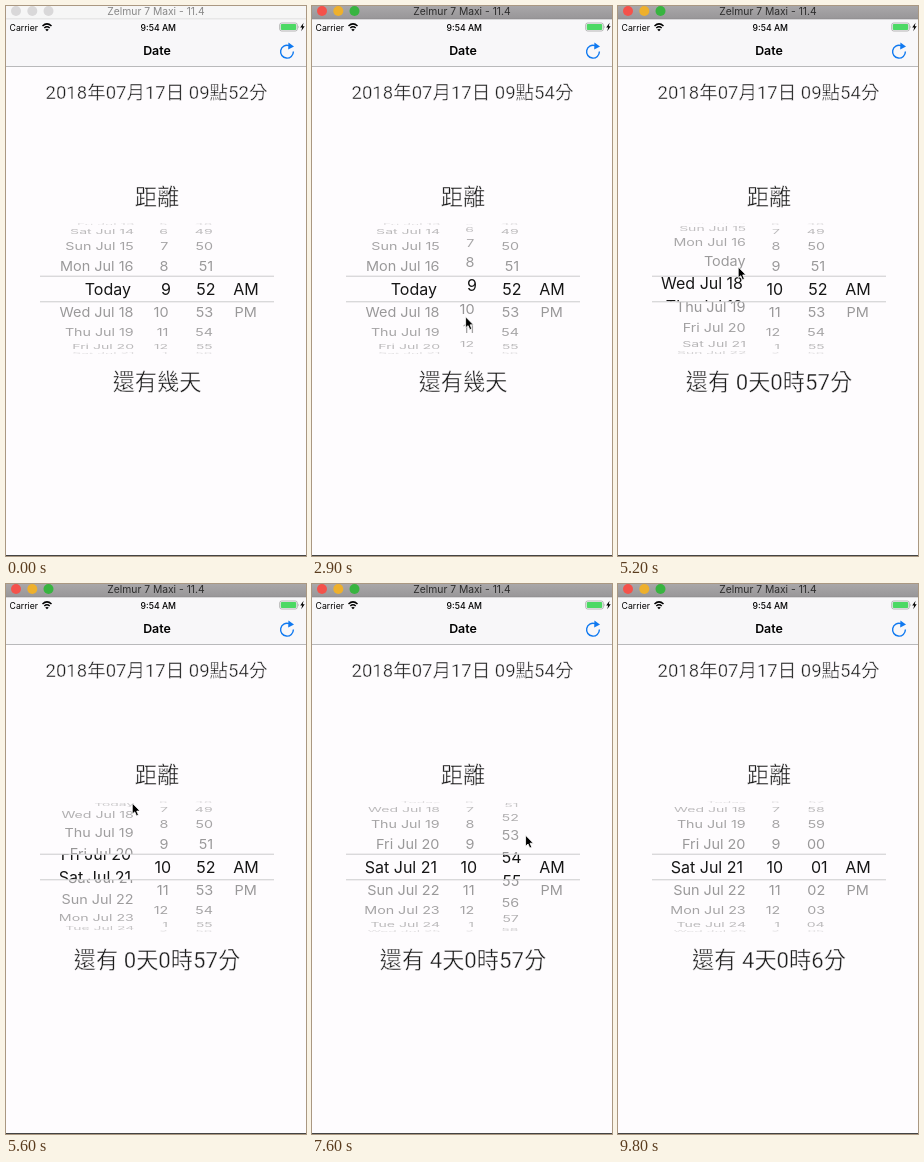
An HTML page that plays this animation: 300 px wide and 550 px high, repeating every 10 s.

```html
<!DOCTYPE html>
<html lang="zh-Hant">
<head>
<meta charset="utf-8">
<title>Date</title>
<style>
  html, body { margin: 0; width: 100%; height: 100%; overflow: hidden; background: #fefcfe; }
  svg { display: block; width: 300px; height: 550px; }
  text { font-family: Inter, "Open Sans", sans-serif; white-space: pre; }
  .mid { text-anchor: middle; }
  /* the pale stroke thins the glyphs to a light weight */
  .label { font-family: Roboto, "Noto Sans CJK TC", "Noto Sans CJK", sans-serif; font-size: 22.2px; fill: #1c1c1c; stroke: #fefcfe; stroke-width: .45; }
  .wheel { font-size: 16px; fill: #161616; }
  #bar { fill: #f6f6f6; }
  #edge { fill: #dadada; }
  #lights { fill: #d9d8d9; }
  #title { fill: #888; font-size: 10.3px; }
  .active #bar { fill: url(#metal); }
  .active #edge { fill: #8f8d8f; }
  .active #title { fill: #2c2c2c; }
  .active .red { fill: #f4524b; }
  .active .yellow { fill: #eeb02c; }
  .active .green { fill: #38b440; }
</style>
</head>
<body>
<svg id="stage" viewBox="0 0 300 550">
  <defs>
    <linearGradient id="metal" x2="0" y2="1">
      <stop stop-color="#a9a7a9"/><stop offset="1" stop-color="#989698"/>
    </linearGradient>
    <clipPath id="inside"><path d="M30 270.5H272V295.5H30Z"/></clipPath>
    <clipPath id="outside"><path d="M30 216H272V270H30ZM30 296H272V350H30Z"/></clipPath>
  </defs>
  <rect width="300" height="550" fill="#fefcfe"/>
  <rect y="13" width="300" height="47" fill="#f8f7f9"/>
  <rect y="60" width="300" height="1" fill="#b9b9bb"/>
  <rect y="549" width="300" height="1" fill="#444"/>

  <rect id="bar" width="300" height="13"/>
  <rect id="edge" y="12.5" width="300" height=".8"/>
  <g id="lights">
    <circle class="red" cx="10" cy="5" r="5"/>
    <circle class="yellow" cx="26.3" cy="5" r="5"/>
    <circle class="green" cx="42.5" cy="5" r="5"/>
  </g>
  <text id="title" class="mid" x="150" y="9">Zelmur 7 Maxi - 11.4</text>

  <text x="3.6" y="24.5" font-size="8.7">Carrier</text>
  <g fill="none" stroke="#000" stroke-width="1.5">
    <path d="M36.5 20Q41 15.8 45.5 20M38.3 22Q41 19.6 43.7 22"/>
    <path d="M39.8 23.2L41 24.4 42.2 23.2" stroke-width="1.3"/>
  </g>
  <text class="mid" x="152.3" y="24.5" font-size="8.7" font-weight="500">9:54 AM</text>
  <rect x="273.7" y="17" width="17.6" height="8" rx="2" fill="none" stroke="#999" stroke-width=".7"/>
  <rect x="274.8" y="18.1" width="15.4" height="5.8" rx="1" fill="#4cd964"/>
  <path d="M292.2 19.6Q293.4 21 292.2 22.4Z" fill="#999"/>
  <path d="M297.6 16.8L294.2 21.6H296.2L295.2 25.2 298.7 20.3H296.7Z"/>
  <text class="mid" x="151" y="49.3" font-size="12.4" font-weight="600">Date</text>
  <path d="M287.4 45.6A6.4 6.4 0 1 1 283 39.6" fill="none" stroke="#1079f0" stroke-width="1.4"/>
  <path d="M282.4 36.6L288 40.6 282.2 43.4Z" fill="#1079f0"/>

  <text id="now" class="label mid" x="150.5" y="92.8" style="font-size:18.5px"></text>
  <text class="label mid" x="151" y="199">距離</text>
  <text id="left" class="label mid" x="151" y="383.5"></text>

  <g id="outer" class="wheel" clip-path="url(#outside)"></g>
  <g id="lens" class="wheel" clip-path="url(#inside)"></g>
  <path d="M34 270.2H268M34 295.8H268" stroke="#c6c6c8" stroke-width=".9"/>

  <path id="cursor" d="M0 0V11L2.5 8.8 4.2 12.8 6.2 12 4.5 8H7.8Z" stroke="#fff" stroke-width=".8"/>
</svg>
<script>
const LOOP = 10000, STEP = 100;
const CENTER = 283, RADIUS = 65, ANGLE = 20.7 * Math.PI / 180, REACH = 4;
const byId = id => document.getElementById(id);
const mod = (n, size) => (n % size + size) % size;

// eased progress from 0 to 1 between two times
function ease(t, start, end) {
  const u = Math.min(Math.max((t - start) / (end - start), 0), 1);
  return u * u * (3 - 2 * u);
}

// pointer moves: start, end, x, y; it rests in between
const entry = [290, 150];
const moves = [
  [100, 600, 281, 47],    // to the refresh button
  [1000, 1600, 205, 319],
  [1600, 2400, 154, 315], // to the hours
  [2700, 3400, 152, 294],
  [3400, 3800, 144, 305],
  [3800, 4600, 116, 290], // to the days
  [4800, 5750, 127, 214],
  [6300, 6400, 138, 211],
  [6400, 7100, 198, 289], // to the minutes
  [7200, 7800, 219, 238],
  [7800, 8400, 198, 265],
  [8400, 9300, 201, 243],
  [9400, 9700, 266, 242]
];

function pointerAt(t) {
  return moves.reduce(([x, y], [start, end, toX, toY]) => {
    const k = ease(t, start, end);
    return [x + (toX - x) * k, y + (toY - y) * k];
  }, entry);
}

const dayName = n => n ? new Date(2018, 6, 17 + n).toDateString().slice(0, 10) : 'Today';

// edge: anchor in the lens; pivot: point the smaller rows shrink towards
const columns = [
  { edge: 125, pivot: 150, anchor: 'end', roll: t => 4 * ease(t, 4850, 5800), name: dayName },
  { edge: 165, pivot: 140, anchor: 'end', roll: t => ease(t, 2700, 3500), name: n => mod(n + 8, 12) + 1 },
  { edge: 209.5, pivot: 186, anchor: 'end', roll: t => 8 * ease(t, 7200, 8300) + ease(t, 8250, 9350),
    name: n => String(mod(n + 52, 60)).padStart(2, '0') },
  { edge: 240, pivot: 237, anchor: 'middle', roll: () => 0, name: n => ['AM', 'PM'][n] || '' }
];

function makeRows(parent, anchor) {
  return Array.from({ length: 2 * REACH + 1 }, () => {
    const row = document.createElementNS('http://www.w3.org/2000/svg', 'text');
    row.setAttribute('y', 5.8);
    row.setAttribute('text-anchor', anchor);
    return parent.appendChild(row);
  });
}

for (const column of columns) {
  column.outer = makeRows(byId('outer'), column.anchor);
  column.lens = makeRows(byId('lens'), column.anchor);
}

function placeRow(row, column, index, position, inLens) {
  const angle = (index - position) * ANGLE;
  const flat = Math.max(Math.cos(angle), 0);
  const scale = inLens ? 1 : .905 - .05 * (1 - flat);
  const x = column.pivot + (column.edge - column.pivot) * scale;
  const y = CENTER + RADIUS * Math.sin(angle);
  row.textContent = column.name(index);
  row.setAttribute('transform', `translate(${x} ${y}) scale(${scale} ${scale * flat})`);
  row.setAttribute('opacity', inLens ? 1 : .45 * flat ** .6);
}

function drawColumn(column, t) {
  const position = column.roll(t);
  const first = Math.round(position) - REACH;
  column.outer.forEach((row, i) => placeRow(row, column, first + i, position, false));
  column.lens.forEach((row, i) => placeRow(row, column, first + i, position, true));
}

function remaining(t) {
  if (t < 3500) return '還有幾天';
  return `還有 ${t < 6100 ? 0 : 4}天0時${t < 9500 ? 57 : 6}分`;
}

function draw(t) {
  byId('stage').classList.toggle('active', t >= 300);
  byId('now').textContent = `2018年07月17日 09點${t < 900 ? 52 : 54}分`;
  byId('left').textContent = remaining(t);
  columns.forEach(column => drawColumn(column, t));
  byId('cursor').setAttribute('transform', `translate(${pointerAt(t)})`);
  byId('cursor').style.display = t >= 100 && t < 9800 ? '' : 'none';
}

const start = performance.now();
let shown = -1;
function tick() {
  const t = Math.floor((performance.now() - start) % LOOP / STEP) * STEP;
  if (t !== shown) draw(shown = t);
  requestAnimationFrame(tick);
}
tick();
</script>
</body>
</html>
```
